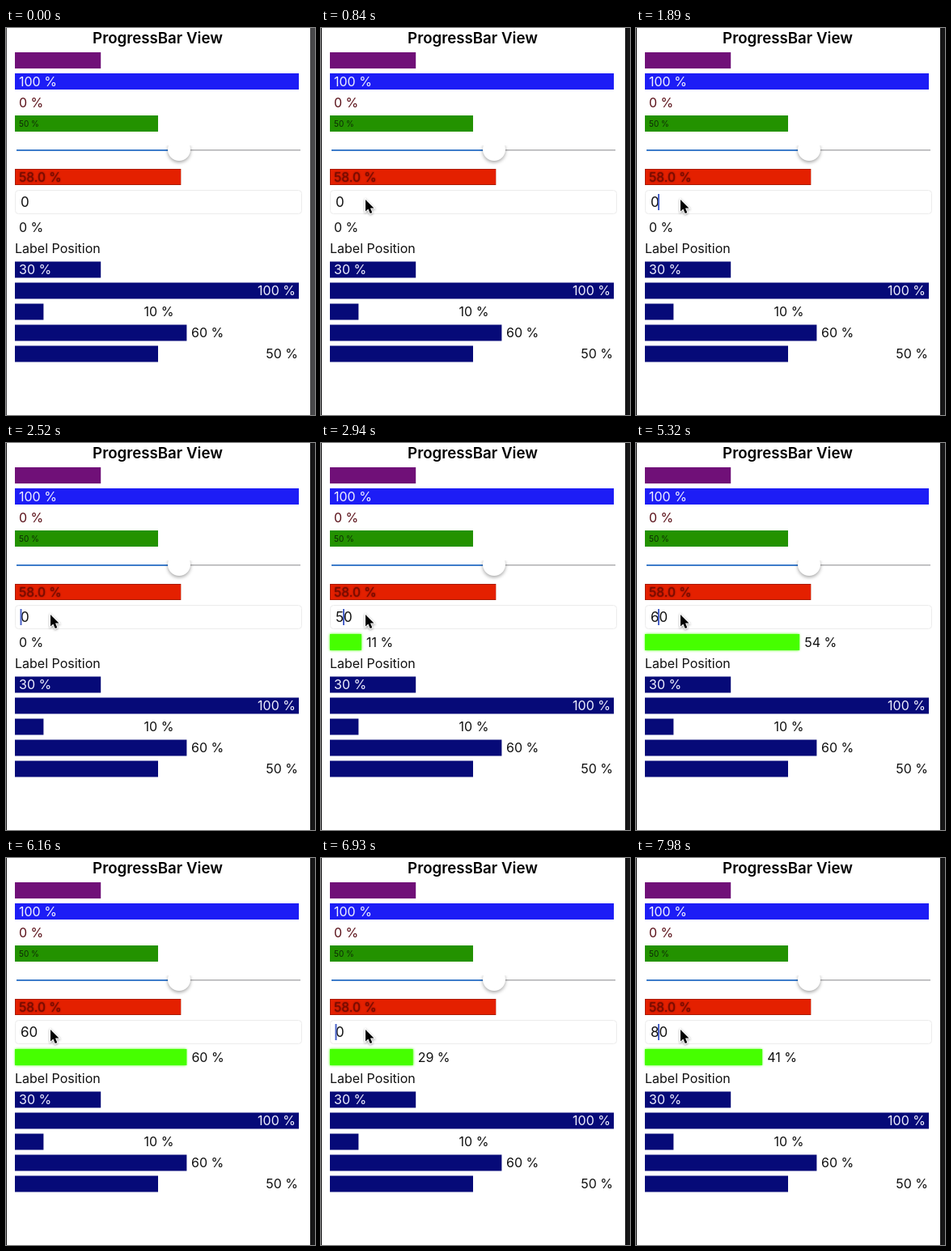
An HTML page with a canvas that plays this animation: 382x478 px, repeating every 8000 ms.

```html
<!DOCTYPE html>
<html lang="en">
<head>
<meta charset="utf-8">
<title>ProgressBar View</title>
<style>
  html, body { margin: 0; width: 100%; height: 100%; overflow: hidden; background: #fff; }
  canvas { display: block; }
</style>
</head>
<body>
<canvas id="stage" width="382" height="478"></canvas>
<script>
const ctx = document.getElementById('stage').getContext('2d');
const LOOP = 8000, LEFT = 11, UNIT = 3.54, MS_PER_PERCENT = 10;
const NAVY = '#060a78';

// Each edit: time, field text, caret x, value the bar runs to
const edits = [
  [0, '0', null, 0],
  [1000, '0', 28, 0],
  [2500, '0', 18.5, 0],
  [2830, '50', 28, 50],
  [4060, '0', 18.5, 0],
  [4780, '60', 28, 60],
  [6620, '0', 18.5, 0],
  [7570, '80', 28, 80]
];

const clamp = (v, lo = 0, hi = 1) => Math.min(hi, Math.max(lo, v));
const ramp = (t, from, to) => clamp((t - from) / (to - from));

function rect(x, y, w, h, color) {
  ctx.fillStyle = color;
  ctx.fillRect(x, y, w, h);
}

function text(str, x, middle, color = '#111', size = 16, align = 'left', weight = 400) {
  ctx.font = `${weight} ${size}px Inter, sans-serif`;
  ctx.textAlign = align;
  ctx.fillStyle = color;
  ctx.fillText(str, x, middle + size * 0.364);
}

const bar = (percent, y, color, h = 20) => rect(LEFT, y, percent * UNIT, h, color);

function shadowed(color, blur, dy, draw) {
  ctx.save();
  ctx.shadowColor = color;
  ctx.shadowBlur = blur;
  ctx.shadowOffsetY = dy;
  draw();
  ctx.restore();
}

function slider() {
  rect(13, 150, 351, 1.6, '#b4b4b6');
  rect(13, 150, 201, 2, '#3d7cca');
  shadowed('rgba(0,0,0,.35)', 4, 2, () => {
    ctx.save();
    ctx.beginPath();
    ctx.rect(190, 145, 48, 30);
    ctx.clip();
    ctx.beginPath();
    ctx.arc(214, 150, 14, 0, 7);
    ctx.fillStyle = '#fff';
    ctx.fill();
    ctx.restore();
  });
}

function pointer(x, y) {
  ctx.save();
  ctx.translate(x, y);
  const shape = new Path2D('M0 0V14.5L3.4 11.5L5.7 17L8.3 16L6 10.6H10.5Z');
  ctx.lineWidth = 2;
  ctx.strokeStyle = '#fff';
  shadowed('rgba(0,0,0,.4)', 3, 1, () => ctx.stroke(shape));
  ctx.fillStyle = '#000';
  ctx.fill(shape);
  ctx.restore();
}

function barValue(t) {
  let value = 0;
  edits.forEach(([start, , , goal], i) => {
    if (t < start) return;
    const end = Math.min(t, edits[i + 1]?.[0] ?? LOOP);
    const step = (end - start) / MS_PER_PERCENT;
    value += clamp(goal - value, -step, step);
  });
  return Math.round(value);
}

function field(t) {
  ctx.beginPath();
  ctx.roundRect(11.5, 200.5, 354, 29, 4);
  ctx.lineWidth = 1;
  ctx.strokeStyle = '#ececec';
  ctx.stroke();

  const [start, content, caretX] = edits.findLast(e => t >= e[0]);
  text(content, 18, 215, '#111', 17);
  if (caretX === null) return;
  const age = t - start;
  ctx.globalAlpha = 1 - ramp(age, 950, 1130) + ramp(age, 1450, 1590);
  rect(caretX - 1, 205, 2, 20, '#4a62c8');
  ctx.globalAlpha = 1;
}

function animatedBar(t) {
  const value = barValue(t);
  if (value > 0) {
    shadowed('#48ff00', 3, 0, () => bar(value, 236, '#46ff00'));
  }
  text(`${value} %`, value > 0 ? LEFT + value * UNIT + 6 : 16, 246);
}

function draw(t) {
  rect(0, 0, 382, 478, '#fff');
  const edge = t < 770 ? '#48484a' : '#161617';
  rect(0, 0, 1, 478, edge);
  rect(376, 0, 6, 478, edge);

  text('ProgressBar View', 187.5, 12, '#000', 18.7, 'center', 600);

  bar(30, 30, '#701078');
  rect(LEFT, 56, 351, 20, '#1d1df6');
  text('100 %', 16, 66, '#f0f0ff');
  text('0 %', 16, 92, '#5a1018');
  bar(50, 108, '#239200');
  text('50 %', 16, 118, '#0d2906', 10);

  slider();

  bar(58, 174, '#a91b05');
  rect(12, 175, 204, 18, '#e42000');
  shadowed('#7a0c00', 2, 0, () => text('58.0 %', 16, 184, '#7a0c00', 15.5, 'left', 500));

  field(t);
  animatedBar(t);

  text('Label Position', 11, 272);
  bar(30, 288.5, NAVY);
  text('30 %', 16, 298.5, '#f0f0ff');
  rect(LEFT, 314.5, 351, 20, NAVY);
  text('100 %', 358, 324.5, '#f0f0ff', 16, 'right');
  bar(10, 340.5, NAVY);
  text('10 %', 189, 350.5, '#111', 16, 'center');
  bar(60, 366.5, NAVY);
  text('60 %', 229, 376.5);
  bar(50, 392.5, NAVY);
  text('50 %', 361, 402.5, '#111', 16, 'right');

  if (t >= 70) {
    const p = ramp(t, 70, 760), ease = p * p * (3 - 2 * p);
    pointer(380 - 325 * ease, 400 - 188 * ease);
  }
}

function frame() {
  draw(performance.now() % LOOP);
  requestAnimationFrame(frame);
}
frame();
</script>
</body>
</html>
```
